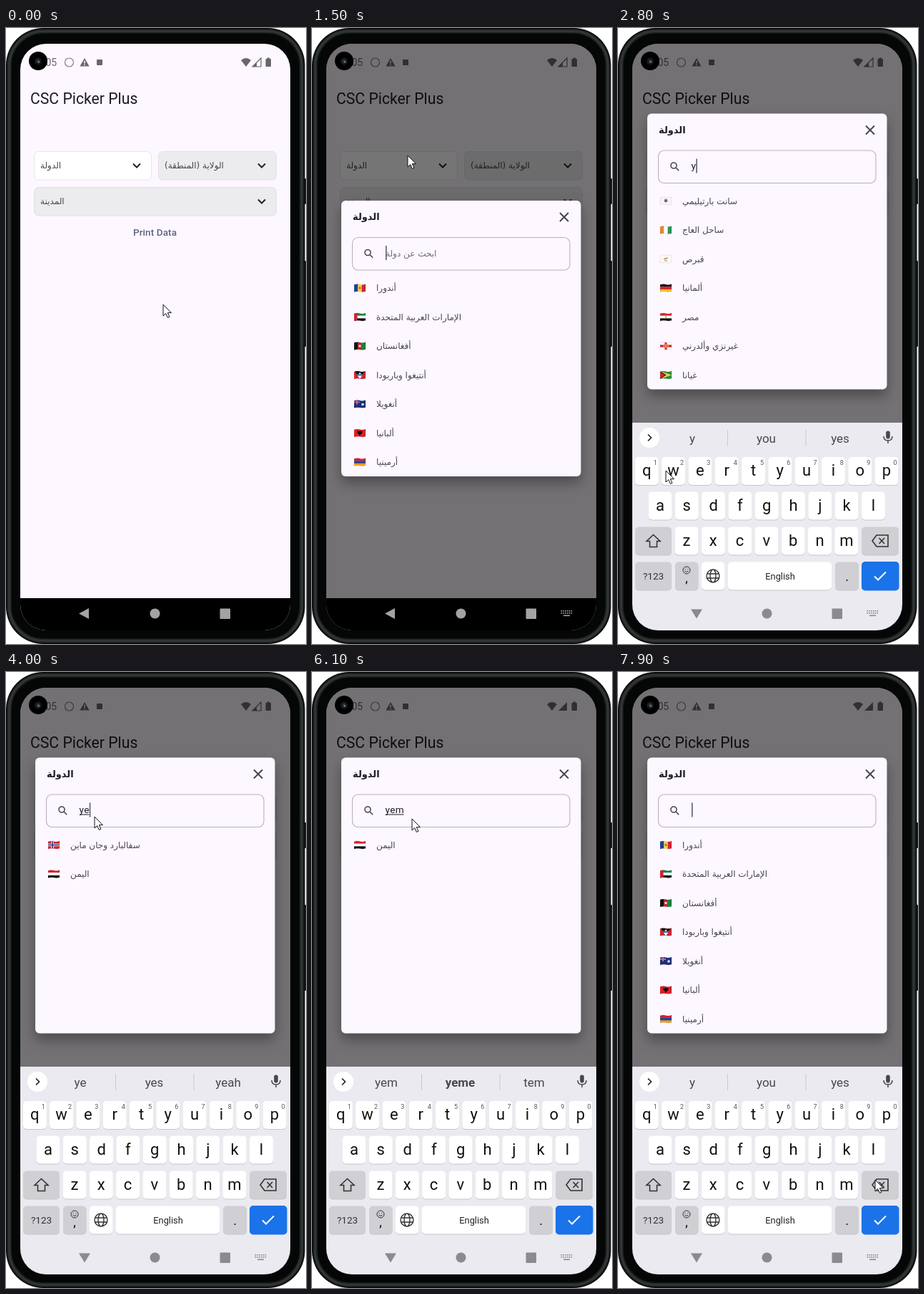
Animation of 420 by 860 pixels, one loop 8 s. Source, as an HTML page with a canvas:

```html
<!DOCTYPE html>
<html lang="ar">
<head>
<meta charset="utf-8">
<title>CSC Picker Plus</title>
<style>
html, body { margin: 0; width: 100%; height: 100%; overflow: hidden; background: #fff; }
canvas { display: block; width: 420px; height: 860px; }
</style>
</head>
<body>
<canvas id="stage" width="420" height="860"></canvas>
<script>
const ctx = document.getElementById('stage').getContext('2d');
const LOOP = 8000;
const PAPER = '#fdf7ff', INK = '#1f1c22';

// Drawing helpers
function box(x, y, w, h, r, fill, stroke, lw = 1) {
  ctx.beginPath();
  ctx.roundRect(x, y, w, h, r);
  if (fill) { ctx.fillStyle = fill; ctx.fill(); }
  if (stroke) { ctx.strokeStyle = stroke; ctx.lineWidth = lw; ctx.stroke(); }
}
function disc(x, y, r, fill) {
  ctx.beginPath();
  ctx.arc(x, y, r, 0, Math.PI * 2);
  ctx.fillStyle = fill;
  ctx.fill();
}
function icon(d, x, y, { fill, stroke, w = 1.6 } = {}) {
  const p = new Path2D(d);
  ctx.save();
  ctx.translate(x, y);
  if (fill) { ctx.fillStyle = fill; ctx.fill(p, 'evenodd'); }
  if (stroke) { ctx.strokeStyle = stroke; ctx.lineWidth = w; ctx.stroke(p); }
  ctx.restore();
}
function text(s, x, y, size, color, { weight = 400, align = 'left', gap = 0 } = {}) {
  ctx.font = `${weight} ${size}px Roboto, sans-serif`;
  ctx.direction = 'ltr';
  ctx.textAlign = align;
  ctx.letterSpacing = gap + 'px';
  ctx.fillStyle = color;
  ctx.fillText(s, x, y);
  const width = ctx.measureText(s).width;
  ctx.letterSpacing = '0px';
  return width;
}
function arabic(s, x, y, color, size = 12, weight = 400) {
  ctx.font = `${weight} ${size}px "DejaVu Sans", sans-serif`;
  ctx.direction = 'rtl';
  ctx.textAlign = 'left';
  ctx.fillStyle = color;
  ctx.fillText(s, x, y);
}

// Flags: a stripe direction, colours, and optional details on a 16 x 11 field
const rect = (c, x, y, w, h) => { ctx.fillStyle = c; ctx.fillRect(x, y, w, h); };
const poly = (c, d) => icon(d, 0, 0, { fill: c });
const dot = (c, x = 8, y = 5.5, r = 1.7) => () => disc(x, y, r, c);
const cross = (c, x, w) => { rect(c, x - w / 2, 0, w, 11); rect(c, 0, 5.5 - w / 2, 16, w); };
const RED = '#d32232';
const FLAGS = {
  ad: ['v', ['#21409a', '#f5d142', RED], dot('#b9763c')],
  ae: ['h', ['#11843f', '#fff', '#111'], () => rect(RED, 0, 0, 4.5, 11)],
  af: ['v', ['#111', '#bf2026', '#16803c'], dot('#eadfd8')],
  ag: ['h', [RED], () => {
    poly('#111', 'M1 0H15L8 11Z');
    poly('#2b70c9', 'M3.5 4H12.5L8 11Z');
    poly('#fff', 'M4.8 6.5H11.2L8 11Z');
    disc(8, 3.4, 1.3, '#f5d142');
  }],
  ai: ['h', ['#1c2f7c'], () => {
    rect('#d8d8e6', 0, 2.2, 8, 1.4); rect('#d8d8e6', 3.2, 0, 1.4, 6);
    rect(RED, 0, 2.6, 8, .7); rect(RED, 3.6, 0, .7, 6);
    disc(12, 6, 1.8, '#e9e6dc');
  }],
  al: ['h', ['#dd1f26'], () => poly('#1b0d0d', 'M8 1.8L9.4 3 12 2.6 11 6 9.5 7 8 9.5 6.5 7 5 6 4 2.6 6.6 3Z')],
  am: ['h', [RED, '#2343a0', '#f0a020']],
  bl: ['h', ['#f6f4f7'], () => { disc(8, 5, 2.5, '#a98262'); disc(8, 5.4, 1.2, '#34559d'); }],
  ci: ['v', ['#ee8336', '#fff', '#2c9155']],
  cy: ['h', ['#fafafa'], () => { poly('#df8f3c', 'M4.5 5L11.5 2.8 9.5 5.6 6 6.5Z'); rect('#66844c', 6, 7.6, 4, .8); }],
  de: ['h', ['#111', RED, '#f3c326']],
  eg: ['h', [RED, '#fff', '#111'], dot('#c5a23a', 8, 5.5, 1.2)],
  gg: ['h', ['#fff'], () => { cross(RED, 8, 3.2); rect('#f1cc48', 4, 5, 8, 1); rect('#f1cc48', 7.5, 2, 1, 7); }],
  gy: ['h', ['#258b46'], () => {
    poly('#f5d142', 'M0 0L16 5.5 0 11Z');
    poly('#111', 'M0 0L8.6 5.5 0 11Z');
    poly(RED, 'M0 1L7 5.5 0 10Z');
  }],
  sj: ['h', [RED], () => { cross('#fff', 6, 3.4); cross('#21387c', 6, 1.6); }],
  ye: ['h', [RED, '#fff', '#111']]
};
function flag(code, x, y) {
  const [dir, colors, extra] = FLAGS[code];
  const n = colors.length;
  ctx.save();
  ctx.translate(x, y);
  const wave = new Path2D('M0 .8Q4-.8 8 .4T16 0V10.2Q12 11.6 8 10.6T0 11Z');
  ctx.save();
  ctx.clip(wave);
  colors.forEach((c, i) => dir === 'v'
    ? rect(c, i * 16 / n, -1, 16 / n + .2, 13)
    : rect(c, 0, i * 11 / n - (i ? 0 : 1), 16, 11 / n + 1.2));
  if (extra) extra();
  ctx.restore();
  ctx.strokeStyle = 'rgba(0,0,0,.12)';
  ctx.lineWidth = .6;
  ctx.stroke(wave);
  ctx.restore();
}

// Country lists and the states of the search field
const ALL = [['ad', 'أندورا'], ['ae', 'الإمارات العربية المتحدة'], ['af', 'أفغانستان'],
  ['ag', 'أنتيغوا وباربودا'], ['ai', 'أنغويلا'], ['al', 'ألبانيا'], ['am', 'أرمينيا']];
const WITH_Y = [['bl', 'سانت بارتيليمي'], ['ci', 'ساحل العاج'], ['cy', 'قبرص'],
  ['de', 'ألمانيا'], ['eg', 'مصر'], ['gg', 'غيرنزي وألدرني'], ['gy', 'غيانا']];
const WITH_YE = [['sj', 'سفالبارد وجان ماين'], ['ye', 'اليمن']];
const Y = ['y', 'you', 'yes'], YE = ['ye', 'yes', 'yeah'];
const STEPS = [
  { at: 1500, typed: '', rows: ALL, words: null },
  { at: 2500, typed: 'y', rows: WITH_Y, words: Y },
  { at: 3600, typed: 'ye', rows: WITH_YE, words: YE },
  { at: 5200, typed: 'yem', rows: WITH_YE.slice(1), words: ['yem', 'yeme', 'tem'] },
  { at: 7000, typed: 'ye', rows: WITH_YE, words: YE },
  { at: 7400, typed: 'y', rows: WITH_Y, words: Y },
  { at: 7800, typed: '', rows: ALL, words: Y }
];

// Pointer path: time, x, y
const PATH = [[300, 220, 386], [900, 134, 178], [1550, 134, 178], [1800, 136, 190], [1900, 136, 190],
  [2400, 222, 622], [2550, 222, 622], [2800, 67, 618], [3050, 112, 624], [3650, 112, 624],
  [4000, 124, 202], [4200, 124, 202], [4850, 316, 718], [5200, 316, 718], [5900, 140, 205],
  [6150, 140, 205], [6800, 360, 709]];
function pointerAt(t) {
  const i = PATH.findIndex(p => p[0] > t);
  if (i === 0) return PATH[0].slice(1);
  if (i < 0) return PATH[PATH.length - 1].slice(1);
  const [a, b] = [PATH[i - 1], PATH[i]];
  const u = (t - a[0]) / (b[0] - a[0]), k = u * u * (3 - 2 * u);
  return [a[1] + (b[1] - a[1]) * k, a[2] + (b[2] - a[2]) * k];
}

function drawBody() {
  ctx.fillStyle = '#fff';
  ctx.fillRect(0, 0, 420, 860);
  box(415, 210, 5, 36, 1, '#1c1e1e');
  box(415, 325, 5, 120, 1, '#1c1e1e');
  box(0, 0, 418.5, 860, 52, '#050606');
  // Soft rim light
  [[7, '#141616'], [5, '#212424'], [3, '#303434']].forEach(([w, c]) =>
    box(4.5, 4.5, 409.5, 851, 48, null, c, w));
}

function drawStatus(t) {
  const c = '#6a666c';
  text('05', 55.5, 53, 14, c);
  ctx.beginPath();
  ctx.arc(88.5, 48, 6, 0, 7);
  ctx.strokeStyle = '#858087';
  ctx.lineWidth = 1.2;
  ctx.stroke();
  icon('M0-6L6.6 5.6H-6.6Z M-.8-2.2V1.6H.8V-2.2Z M-.8 2.7V4.3H.8V2.7Z', 110, 48, { fill: c });
  box(127, 44, 8, 8, 1, c);
  icon('M0 6L-7-3Q0-9 7-3Z', 336, 48, { fill: c });
  icon('M6-6V6H-6Z', 351, 48, t < 5500 ? { stroke: c, w: 1.2 } : { fill: c });
  if (t < 5500) icon('M0 0V6H-6Z', 351, 48, { fill: c });
  box(363.5, 43, 7.5, 11, 1, c);
  box(365.5, 41.5, 3.5, 2, 0, c);
}

function dropdown(x, y, w, label, textX, active) {
  box(x, y, w, 39.5, 6, active ? '#fff' : '#ececee', active ? '#e9e4ec' : '#e2dfe5');
  arabic(label, textX, y + 23, '#49464c');
  icon('M-5-2.5L0 2.5 5-2.5', x + w - 20.5, y + 19.5, { stroke: '#222', w: 2 });
}

function drawApp(t) {
  ctx.fillStyle = PAPER;
  ctx.fillRect(20, 22, 378, 820);
  drawStatus(t);
  text('CSC Picker Plus', 34, 105.5, 21.2, INK);
  dropdown(39.5, 172.5, 164, 'الدولة', 48, true);
  dropdown(213.5, 172.5, 165, 'الولاية (المنطقة)', 222, false);
  dropdown(39.5, 222.5, 339, 'المدينة', 48, false);
  text('Print Data', 208.5, 290, 13.5, '#5f6287', { weight: 500, align: 'center', gap: .1 });
}

function drawDialog(top, t, step) {
  ctx.save();
  ctx.shadowColor = 'rgba(0,0,0,.35)';
  ctx.shadowBlur = 18;
  ctx.shadowOffsetY = 9;
  box(41, top, 335.5, 385, 6, PAPER);
  ctx.restore();
  ctx.save();
  ctx.translate(0, top);
  arabic('الدولة', 57, 27, INK, 13, 700);
  icon('M-6-6L6 6M6-6L-6 6', 353, 23, { stroke: '#45424a', w: 1.9 });
  box(56.5, 51.5, 304.5, 45.5, 8, null, '#b8b3ba', 1.1);
  icon('M3 -1A4 4 0 1 1 -5 -1A4 4 0 1 1 3 -1M1.8 1.8L6.2 6.2', 79, 73.5, { stroke: '#49464c', w: 1.6 });

  let caretX = 103.5;
  if (step.typed) {
    const w = text(step.typed, 102.5, 77, 13.6, INK, { gap: .35 });
    if (step.typed.length > 1) rect(INK, 103, 79, w - 1, 1);
    caretX = 102.5 + w + .5;
  } else if (!step.words) {
    arabic('ابحث عن دولة', 103, 78, '#716d75');
  }
  if ((t - step.at) % 1000 < 500) rect('#5c5c74', caretX - .5, 63, 1.6, 20);

  step.rows.forEach(([code, name], i) => {
    const y = 122 + i * 40.5;
    flag(code, 59, y - 5.5);
    arabic(name, 90, y + 4, '#49464c');
  });
  ctx.restore();
}

function key(x, y, w, fill = '#fff') {
  box(x, y + 1, w, 39, 5, '#c6c6cb');
  box(x, y, w, 39, 5, fill);
}
function keyRow(letters, x, y, digits) {
  [...letters].forEach((ch, i) => {
    const cx = x + i * 37.3;
    key(cx - 16.5, y, 33);
    text(ch, cx, y + 26, 22, '#111', { align: 'center' });
    if (digits) text('1234567890'[i], cx + 12, y + 11, 9, '#555', { align: 'center' });
  });
}

function drawToolbar(words) {
  const c = '#46484c', line = { stroke: c, w: 1.7 };
  disc(44, 572, 14, '#fff');
  icon(words ? 'M-2-4.5L2.5 0-2 4.5' : 'M2-4.5L-2.5 0 2 4.5', 44, 572, { stroke: '#222', w: 1.7 });
  icon('M-6-1Q-6 5 0 5T6-1M0 5V9', 378, 571, { stroke: c, w: 1.5 });
  box(375.2, 562.5, 5.6, 11, 2.8, c);
  if (words) {
    words.forEach((s, i) => text(s, 104 + i * 103.5, 579, 17, c,
      { align: 'center', weight: s === 'yeme' ? 700 : 400 }));
    rect('#c9c9ce', 153, 561, 1, 23);
    rect('#c9c9ce', 262.5, 561, 1, 23);
    return;
  }
  icon('M-7-7H7V2L2 7H-7ZM7 2H2V7M-3.5 0Q0 4 3.5 0M-3-3.5V-2M3-3.5V-2', 93, 572, line);
  text('GIF', 147, 577, 14, c, { weight: 700, align: 'center', gap: .6 });
  icon('M-6.5-6.5H6.5V8H-6.5ZM-3-7.5H3V-4.5H-3ZM-3.5-1H3.5M-3.5 2H3.5M-3.5 5H1', 202, 571.5, { stroke: c, w: 1.5 });
  for (let i = 0; i < 8; i++) {
    const a = i * Math.PI / 4;
    disc(257 + Math.cos(a) * 6, 572 + Math.sin(a) * 6, 1.9, c);
  }
  icon('M6 0A6 6 0 1 1-6 0A6 6 0 1 1 6 0M2.5 0A2.5 2.5 0 1 0-2.5 0A2.5 2.5 0 1 0 2.5 0', 257, 572, { fill: c });
  rect('#d0d0d5', 289.5, 561, 1, 22);
  [-6, 0, 6].forEach(d => disc(324 + d, 572, 1.9, c));
}

function drawKeyboard(drop, words) {
  const grey = '#cfcfd4';
  ctx.save();
  ctx.translate(0, drop);
  rect('#ebeaf0', 20, 551, 378, 300);
  drawToolbar(words);
  keyRow('qwertyuiop', 40.3, 599, true);
  keyRow('asdfghjkl', 59, 647.5);
  keyRow('zxcvbnm', 96, 696.5);
  key(24, 696.5, 51, grey);
  icon('M0-9L9.5 0H5V8H-5V0H-9.5Z', 49.5, 716.5, { stroke: '#333', w: 1.6 });
  key(341, 696.5, 52, grey);
  icon('M-11 0L-5-8H11V8H-5ZM-1.5-4L6 4M6-4L-1.5 4', 367, 716, { stroke: '#333', w: 1.6 });
  key(24, 745.5, 51, grey);
  text('?123', 49.5, 770, 13.5, '#333', { align: 'center' });
  key(80, 745.5, 32.5, grey);
  icon('M5 0A5 5 0 1 1-5 0A5 5 0 1 1 5 0M-2.5 1Q0 4 2.5 1M-1.8-2V-1M1.8-2V-1', 96, 757, { stroke: '#333', w: 1 });
  text(',', 96, 774, 18, '#111', { align: 'center' });
  key(117, 745.5, 32.5);
  icon('M9 0A9 9 0 1 1-9 0A9 9 0 1 1 9 0M4 0A4 9 0 1 1-4 0A4 9 0 1 1 4 0M-8.4-3H8.4M-8.4 3H8.4', 133, 765, { stroke: '#333', w: 1.4 });
  key(154, 745.5, 145);
  text('English', 227, 770, 12.8, '#222', { align: 'center' });
  key(304, 745.5, 33, grey);
  text('.', 320.5, 772, 18, '#111', { align: 'center' });
  box(341, 745, 52.5, 40.5, 5, '#1a73e8');
  icon('M-8 0L-3 5 8-6', 367, 765.5, { stroke: '#fff', w: 2 });
  ctx.restore();
}

function drawNav(open, up) {
  const c = up ? '#8b8a90' : '#a3a3a3';
  icon(up ? 'M-8-6H8L0 7Z' : 'M-8 0L6-7.5V7.5Z', 110, 817.5, { fill: c });
  disc(208.5, 817.5, 7, c);
  box(299.5, 810.5, 14.5, 14.5, 1, c);
  if (!open) return;
  for (let row = 0; row < 2; row++)
    for (let i = 0; i < 6; i++) rect(c, 348.5 + i * 2.8, 813 + row * 3, 1.6, 1.7);
  rect(c, 352, 819.5, 9, 1.6);
}

function drawCamera() {
  disc(45, 46, 13, '#000');
  disc(45, 46.5, 5, '#171a1c');
  disc(45, 46.5, 2.2, '#394044');
  disc(46, 47.5, 1, '#9aa0a4');
}

function drawPointer(x, y) {
  icon('M0 0V16L3.7 12.6 6.4 18.4 8.9 17.3 6.3 11.6H11.4Z', x, y, { fill: '#fff', stroke: '#111', w: 1 });
}

function render(t) {
  const open = t >= 1500;
  const u = Math.min(1, Math.max(0, (t - 1550) / 230));
  const rise = 1 - (1 - u) ** 3;
  drawBody();
  ctx.save();
  ctx.beginPath();
  ctx.roundRect(20, 22, 378, 819, 36);
  ctx.clip();
  drawApp(t);
  if (open) rect('rgba(0,0,0,.54)', 20, 22, 378, 820);
  rect('#000', 20, 796, 378, 50);
  if (open) {
    const step = STEPS.findLast(s => s.at <= t);
    drawDialog(241 - 121.5 * rise, t, step);
    if (rise > 0) drawKeyboard(290 * (1 - rise), step.words);
  }
  drawNav(open, rise > .5);
  ctx.restore();
  drawCamera();
  drawPointer(...pointerAt(t));
}

function tick() {
  render(performance.now() % LOOP);
  requestAnimationFrame(tick);
}
tick();
</script>
</body>
</html>
```
